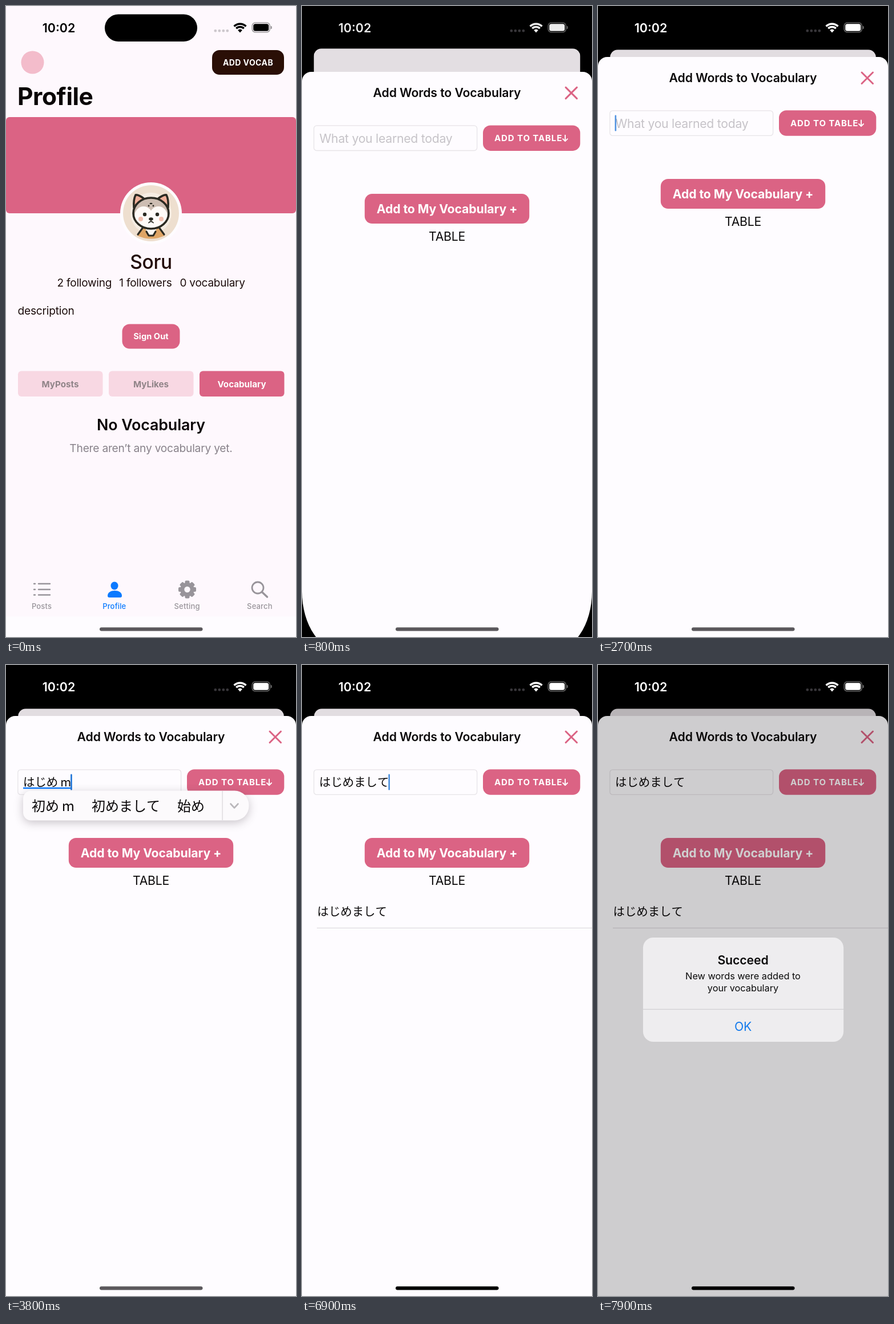
Write an HTML page with a canvas that moves like this. It is 508 px wide and 1102 px high and loops after 8000 ms.

```html
<!DOCTYPE html>
<html lang="ja">
<head>
<meta charset="utf-8">
<title>Vocabulary</title>
<style>
html, body { margin: 0; width: 100%; height: 100%; overflow: hidden; background: #000; }
canvas { display: block; width: 508px; height: 1102px; }
</style>
</head>
<body>
<canvas id="stage" width="508" height="1102"></canvas>
<script>
const W = 508, H = 1102, LOOP = 8000, STEP = 100;
const PINK = '#db6384', PAPER = '#fefcff', BLUE = '#0a7aff', GREY = '#98949a';
const LATIN = 'Inter, "Noto Sans CJK JP", "Noto Sans CJK", sans-serif';
const KANA = '"Noto Sans CJK JP", "Noto Sans CJK", sans-serif';
const WORD = 'はじめまして';
const ctx = document.getElementById('stage').getContext('2d');

// Input states: start time, text, conversion candidates
const TYPING = [
  [3200, 'h', ['h', 'は', 'ハ']],
  [3300, 'は', ['は', '葉', '歯']],
  [3500, 'はj', ['はj', '恥', '初め']],
  [3600, 'はじめ', ['初め', '初めまして', '始め']],
  [3800, 'はじめm', ['初めm', '初めまして', '始め']],
  [3900, 'はじめま', ['初めま', '初めまして', '始め']],
  [4100, 'はじめまし', ['初めまし', '初めまして', '始め']],
  [4200, WORD, ['初めまして', WORD, '始め']],
  [4400, WORD, null]
];

// Caret opacity as time, value
const BLINK = [
  [1600, 0], [1800, 1], [2150, 1], [2400, 0], [2550, 0], [2750, 1],
  [4800, 1], [5100, 0], [5200, 0], [5400, .8], [5600, .8], [5900, 0],
  [6000, 0], [6200, 1], [6850, 1], [7100, 0]
];

const clamp = v => Math.max(0, Math.min(1, v));
const ramp = (t, a, b) => clamp((t - a) / (b - a));

// Critically damped spring from 0 to 1
function spring(t, start, rate) {
  const x = Math.max(0, t - start) / 1000 * rate;
  return 1 - (1 + x) * Math.exp(-x);
}

function track(keys, t) {
  let prev = keys[0];
  for (const key of keys) {
    if (t < key[0]) return prev[1] + (key[1] - prev[1]) * ramp(t, prev[0], key[0]);
    prev = key;
  }
  return prev[1];
}

function group(draw) {
  ctx.save();
  draw();
  ctx.restore();
}

function path(x, y, w, h, r) {
  ctx.beginPath();
  ctx.roundRect(x, y, w, h, r);
}

function box(x, y, w, h, r, color) {
  path(x, y, w, h, r);
  ctx.fillStyle = color;
  ctx.fill();
}

function disc(x, y, r, color) {
  ctx.beginPath();
  ctx.arc(x, y, r, 0, 7);
  ctx.fillStyle = color;
  ctx.fill();
}

function oval(x, y, rx, ry, color) {
  ctx.beginPath();
  ctx.ellipse(x, y, rx, ry, 0, 0, 7);
  ctx.fillStyle = color;
  ctx.fill();
}

function stroke(d, color, width) {
  ctx.strokeStyle = color;
  ctx.lineWidth = width;
  ctx.lineCap = ctx.lineJoin = 'round';
  ctx.stroke(new Path2D(d));
}

function fill(d, color) {
  ctx.fillStyle = color;
  ctx.fill(new Path2D(d));
}

// y is the middle of the capitals
function text(s, x, y, size, color, weight = 400, align = 'center',
              space = weight < 600 ? -.012 : -.004, font = LATIN) {
  ctx.font = `${weight} ${size}px ${font}`;
  ctx.letterSpacing = `${space * size}px`;
  ctx.textAlign = align;
  ctx.fillStyle = color;
  ctx.fillText(s, x, y + size * .364);
  return ctx.measureText(s).width;
}

// Latin letters stand a thin space apart from kana
function kana(s, x, y, size, align = 'left') {
  const spaced = s.replace(/([^a-z])([a-z])/g, '$1\u2009$2');
  return text(spaced, x, y, size, '#0a0809', 350, align, 0, KANA);
}

function avatar() {
  const ink = '#2b2a22';
  disc(254, 362, 54, PAPER);
  disc(254, 362, 49, '#eedfcf');
  disc(254, 362, 36, '#f6ede3');
  fill('M230 401 L238 388 H270 L278 401 Q254 412 230 401Z', '#dfa566');
  fill('M244 388 H264 L259 402 H249Z', '#fdf8f4');
  stroke('M231 399 L239 388 M277 399 L269 388 M246 394 L250 401 H258 L262 394', ink, 3.2);
  for (const side of [-1, 1]) group(() => {
    ctx.translate(254, 0);
    ctx.scale(side, 1);
    fill('M13 336 Q22 329 27 330 Q31 338 30 352Z', '#efb09a');
    stroke('M13 336 Q22 329 27 330 Q31 338 30 352', ink, 3.6);
  });
  oval(254, 362, 31, 27, '#cdbdb2');
  group(() => {
    path(223, 335, 62, 54, 28);
    ctx.clip();
    oval(241, 368, 16, 18, '#fffaf7');
    oval(267, 368, 16, 18, '#fffaf7');
    oval(254, 382, 22, 13, '#fffaf7');
  });
  ctx.beginPath();
  ctx.ellipse(254, 362, 31, 27, 0, 0, 7);
  ctx.strokeStyle = ink;
  ctx.lineWidth = 3.6;
  ctx.stroke();
  for (const side of [-1, 1]) {
    disc(254 + side * 11, 364, 3.2, ink);
    disc(254 + side * 18, 372, 4, '#f3c0b0');
    disc(254 + side * 4, 349, 1.4, ink);
  }
  oval(254, 345, 2.5, 1.3, ink);
  oval(254, 372, 3.8, 2.7, ink);
  stroke('M254 373 V376 M250 378.5 Q254 374 258 378.5', ink, 1.8);
}

function tabs() {
  stroke('M57 1009 H77 M57 1019 H77 M57 1028.5 H77 M49 1009 H51 M49 1019 H51 M49 1028.5 H51', GREY, 2.4);
  oval(190, 1012.5, 6.5, 7, BLUE);
  fill('M178 1030 C178 1024 184 1021 190.5 1021 C197 1021 203 1024 203 1030 Q203 1033 200 1033 H181 Q178 1033 178 1030Z', BLUE);
  group(() => {
    ctx.translate(317.5, 1019);
    for (let i = 0; i < 8; i++) {
      box(-4, -15.5, 8, 8, 2, GREY);
      ctx.rotate(Math.PI / 4);
    }
    ctx.beginPath();
    ctx.arc(0, 0, 8.7, 0, 7);
    ctx.strokeStyle = GREY;
    ctx.lineWidth = 7;
    ctx.stroke();
  });
  ctx.beginPath();
  ctx.arc(441, 1016, 10, 0, 7);
  ctx.lineWidth = 2.8;
  ctx.strokeStyle = GREY;
  ctx.stroke();
  stroke('M449 1024 L457.5 1032', GREY, 3.4);
  ['Posts', 'Profile', 'Setting', 'Search'].forEach((s, i) =>
    text(s, 62.5 + i * 127.3, 1048.5, 13, i === 1 ? BLUE : GREY, 500, 'center', .012));
}

function profile() {
  box(0, 0, W, H, 0, '#fef8fd');
  box(0, 1066, W, 36, 0, PAPER);
  disc(46.5, 98.5, 20, '#f3bccb');
  box(361, 77, 126, 43, 13, '#2a0f06');
  text('ADD VOCAB', 424, 98.5, 14, '#fff', 700, 'center', .03);
  text('Profile', 20, 158, 42.5, '#0a0506', 700, 'left', -.01);
  box(0, 194, W, 168, 6, PINK);
  avatar();
  text('Soru', 254, 446.5, 33.5, '#220c09', 500);
  const ink = '#1c0d0c';
  text('2 following', 89.5, 483, 19, ink, 400, 'left');
  text('1 followers', 198.3, 483, 19, ink, 400, 'left');
  text('0 vocabulary', 304.5, 483, 19, ink, 400, 'left');
  text('description', 20.5, 532, 19.2, ink, 400, 'left');
  box(203.5, 555.5, 101, 43, 13, PINK);
  text('Sign Out', 254, 577, 14.6, '#fff', 700, 'center', .005);
  ['MyPosts', 'MyLikes', 'Vocabulary'].forEach((s, i) => {
    const on = i === 2, x = 21 + i * 159;
    box(x, 637.5, 148.5, 44.5, 6, on ? PINK : '#f8d8e3');
    text(s, x + 74, 660, 15.2, on ? '#fff' : '#908488', 700, 'center', 0);
  });
  text('No Vocabulary', 254, 731, 26.8, '#0a0506', 600);
  text('There aren’t any vocabulary yet.', 254, 772, 19.2, '#88828a');
  tabs();
}

function caret(x, alpha) {
  group(() => {
    ctx.globalAlpha = alpha;
    box(x, 190.5, 2.6, 28, 1.2, '#1a72d6');
  });
}

function candidates(list) {
  group(() => {
    ctx.shadowColor = 'rgba(60,50,60,.28)';
    ctx.shadowBlur = 16;
    ctx.shadowOffsetY = 4;
    box(30, 219.5, 395.5, 52, [14, 25, 25, 14], '#fcfafc');
  });
  box(378.5, 220, 1.2, 51, 0, '#d8d5d9');
  stroke('M393.5 242.5 L400 249.5 L406.5 242.5', '#bab7bb', 2.6);
  group(() => {
    path(30, 219, 346, 53, 0);
    ctx.clip();
    let x = 30;
    for (const s of list) {
      const pad = 15, width = kana(s, x + pad, 246, 24) + 2 * pad;
      x += width;
    }
  });
}

function sheet(t, bottom) {
  box(0, 89, W, H - 89, [16, 16, bottom, bottom], PAPER);
  text('Add Words to Vocabulary', 254, 125.5, 21.2, '#0a0809', 600);
  stroke('M462 116 L481.5 135.5 M481.5 116 L462 135.5', PINK, 3);

  path(20.8, 182.8, 285.8, 43.6, 5);
  ctx.strokeStyle = '#e7e4e8';
  ctx.lineWidth = 1.3;
  ctx.stroke();
  box(317, 182.3, 170.3, 44.5, 13, PINK);
  text('ADD TO TABLE', 337, 204.5, 15, '#fff', 700, 'left', .06);
  stroke('M461 199.5 V209.5 M457 206 L461 210 L465 206', '#fff', 1.9);
  box(109.8, 302, 288.4, 52, 13, PINK);
  text('Add to My Vocabulary +', 254, 328, 21.2, '#fff', 700);
  text('TABLE', 254, 376, 21.2, '#0a0809');

  const state = TYPING.filter(s => t >= s[0]).pop();
  const alpha = track(BLINK, t);
  if (!state) {
    text('What you learned today', 30.5, 205.5, 21.2, '#c6c3c8', 400, 'left');
    caret(29.5, alpha);
  } else {
    const width = kana(state[1], 30, 205, 20.4);
    if (state[2]) box(30, 213.8, width, 2.4, 0, BLUE);
    caret(30 + width - 1, alpha);
    if (state[2]) candidates(state[2]);
  }

  const row = ramp(t, 5950, 6350);
  if (row) group(() => {
    ctx.globalAlpha = row;
    kana(WORD, 26.5, 431, 20.4);
    box(26, 458.7, W - 26, 1.2, 0, '#dedbdf');
  });
}

function alertBox(p) {
  box(0, 0, W, H, 0, `rgba(0,0,0,${.19 * p})`);
  const s = 1.15 - .15 * p;
  ctx.globalAlpha = p;
  ctx.translate(254, 567);
  ctx.scale(s, s);
  ctx.translate(-254, -567);
  box(79, 476, 351, 182, 18, '#eeedef');
  text('Succeed', 254, 515.5, 21.2, '#0a0a0a', 600);
  text('New words were added to', 254, 543.5, 16.3, '#0a0a0a', 400, 'center', 0);
  text('your vocabulary', 254, 564.5, 16.3, '#0a0a0a', 400, 'center', 0);
  box(79, 600.7, 351, 1, 0, '#c9c8cb');
  text('OK', 254, 631, 21.2, '#147aec');
}

function statusBar(p) {
  const v = Math.round(255 * p ** 3), ink = `rgb(${v},${v},${v})`;
  box(173, 14.5, 162, 47.5, 24, '#000');
  text('10:02', 92.5, 38.5, 21.4, ink, 600, 'center', 0);
  for (let i = 0; i < 4; i++) box(364.5 + i * 7, 41, 4.6, 4.6, 1.8, p > .5 ? '#38363a' : '#cdc8cd');
  group(() => {
    ctx.lineCap = 'butt';
    ctx.strokeStyle = ink;
    ctx.lineWidth = 3.4;
    for (const r of [9.5, 14.8]) {
      ctx.beginPath();
      ctx.arc(410, 46, r, -Math.PI * .75, -Math.PI * .25);
      ctx.stroke();
    }
    ctx.beginPath();
    ctx.moveTo(410, 46.5);
    ctx.arc(410, 46, 5.4, -Math.PI * .75, -Math.PI * .25);
    ctx.fillStyle = ink;
    ctx.fill();
  });
  group(() => {
    ctx.globalAlpha = .45;
    path(431.2, 29.2, 31, 16.6, 5.5);
    ctx.strokeStyle = ink;
    ctx.lineWidth = 1.3;
    ctx.stroke();
    box(463.8, 34.7, 1.9, 5.6, [0, 2, 2, 0], ink);
  });
  box(433.2, 31.2, 27, 12.6, 3.6, ink);
}

function render(t) {
  const p = t < 500 ? 0 : t < 1100 ? spring(t, 480, 17.3) : 1;
  box(0, 0, W, H, 0, '#000');
  group(() => {
    const s = 1 - .083 * p;
    ctx.translate(W * (1 - s) / 2, 76.3 * p);
    ctx.scale(s, s);
    path(0, 0, W, H, p ? 15 : 0);
    ctx.clip();
    profile();
    box(0, 0, W, H, 0, `rgba(0,0,0,${.11 * p})`);
  });
  if (p) group(() => {
    ctx.translate(0, (1 - p) * (H - 89));
    sheet(t, p < 1 ? { x: 72, y: 105 } : 0);
  });
  const shown = spring(t, 7250, 12);
  if (shown) group(() => alertBox(shown));
  statusBar(p);
  box(164, 1085.2, 180.5, 6.3, 3.2, t < 4200 ? '#5b585c' : '#000');
}

const start = performance.now();
function frame(now) {
  const t = Math.max(0, now - start) % LOOP;
  render(Math.floor(t / STEP) * STEP);
  requestAnimationFrame(frame);
}
requestAnimationFrame(frame);
</script>
</body>
</html>
```
